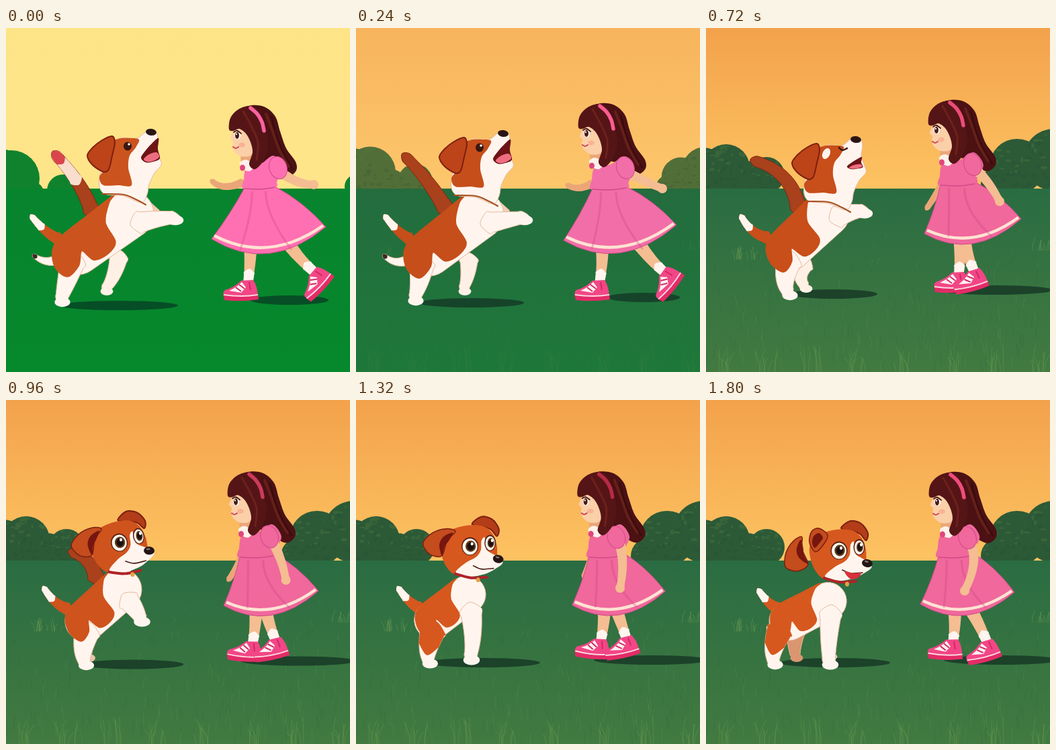
Recreate the animation shown at these times as an HTML page. Size 512x512 px, loop 1920 ms.

```html
<!DOCTYPE html>
<html lang="en">
<head>
<meta charset="utf-8">
<title>Girl and puppy</title>
<style>
html, body { margin: 0; width: 100%; height: 100%; overflow: hidden; background: #f4a34b; }
svg { display: block; width: 100vw; height: 100vh; }
</style>
</head>
<body>
<svg id="stage" viewBox="0 0 512 512" preserveAspectRatio="none"></svg>
<script>
const LOOP = 1920, STEP = 120;
const TIMES = [0, 240, 480, 720, 1200, 1560, 1800];
const stage = document.getElementById('stage');
const updaters = [];

function el(name, attrs, parent = stage) {
  const node = document.createElementNS('http://www.w3.org/2000/svg', name);
  for (const k in attrs) node.setAttribute(k, attrs[k]);
  return parent.appendChild(node);
}

const nums = s => String(s).split(/[ ,]+/).map(Number);
const mix = (a, b, u) => a + (b - a) * u;
const clamp = (v, a, b) => Math.max(a, Math.min(b, v));

// Interpolates key poses; the last one holds, `first` delays the first one.
function track(keys, first = 0) {
  const poses = keys.map(nums), last = poses.length - 1;
  return t => {
    let i = TIMES.length - 1;
    while (TIMES[i] > t) i--;
    const a = poses[clamp(i - first, 0, last)], b = poses[clamp(i + 1 - first, 0, last)];
    const u = i < TIMES.length - 1 ? (t - TIMES[i]) / (TIMES[i + 1] - TIMES[i]) : 0;
    return a.map((v, n) => mix(v, b[n], u));
  };
}

function animate(keys, apply, first) {
  const pose = track(keys, first);
  updaters.push(t => apply(pose(t)));
}

function tint(node, attr, colour) {
  if (Array.isArray(colour)) animate(colour, c => node.setAttribute(attr, `rgb(${c.map(Math.round)})`));
  else node.setAttribute(attr, colour);
}

function show(node, from, to = LOOP) {
  updaters.push(t => node.setAttribute('visibility', t >= from && t < to ? 'inherit' : 'hidden'));
}

// Smooth curve through points.
function curve(p, closed = true, k = 0.16) {
  const n = p.length;
  const at = i => closed ? p[(i + n) % n] : p[clamp(i, 0, n - 1)];
  let d = 'M' + p[0];
  for (let i = 0; i < (closed ? n : n - 1); i++) {
    const [a, b, c, e] = [at(i - 1), at(i), at(i + 1), at(i + 2)];
    d += `C${b[0] + (c[0] - a[0]) * k},${b[1] + (c[1] - a[1]) * k} ` +
         `${c[0] - (e[0] - b[0]) * k},${c[1] - (e[1] - b[1]) * k} ${c}`;
  }
  return d + (closed ? 'Z' : '');
}

const points = s => s.split(' ').map(nums);
function blob(fill, s, parent, attrs = {}) {
  const node = el('path', { d: curve(points(s)), ...attrs }, parent);
  tint(node, 'fill', fill);
  return node;
}
function stroke(colour, width, s, parent, opacity = 1) {
  const node = el('path', { d: curve(points(s), false), fill: 'none', 'stroke-width': width, 'stroke-linecap': 'round', opacity }, parent);
  tint(node, 'stroke', colour);
  return node;
}
function oval(fill, x, y, rx, ry, parent, turn = 0) {
  return el('ellipse', { cx: x, cy: y, rx, ry, fill, transform: `rotate(${turn} ${x} ${y})` }, parent);
}

// Tapered limb: root, middle and end joint; s is the drawn part of its length.
function limb(fill, keys, w0, w1, o = {}) {
  const node = el('path', { stroke: o.edge || 'none', 'stroke-width': 1 });
  const [s0, s1] = o.s || [0, 1], N = 8;
  tint(node, 'fill', fill);
  animate(keys, ([ax, ay, mx, my, bx, by]) => {
    const cx = 2 * mx - (ax + bx) / 2, cy = 2 * my - (ay + by) / 2, one = [], two = [];
    for (let i = 0; i <= N; i++) {
      const s = mix(s0, s1, i / N);
      const x = mix(mix(ax, cx, s), mix(cx, bx, s), s), y = mix(mix(ay, cy, s), mix(cy, by, s), s);
      const dx = mix(cx - ax, bx - cx, s), dy = mix(cy - ay, by - cy, s), len = Math.hypot(dx, dy) || 1;
      const h = mix(w0, w1, s) / 2, tx = dx / len * h, ty = dy / len * h;
      if (i === 0) one.push([x - tx * 0.7, y - ty * 0.7]);
      one.push([x - ty, y + tx]);
      two.unshift([x + ty, y - tx]);
      if (i === N) one.push([x + tx, y + ty]);
    }
    node.setAttribute('d', curve(one.concat(two)));
  }, o.first);
  if (o.from || o.to) show(node, o.from || 0, o.to);
  return node;
}

// Group moved by x, y and an angle about a pivot.
function group(keys, first, px = 0, py = 0, parent = stage) {
  const node = el('g', {}, parent);
  animate(keys, ([x, y, r = 0]) => node.setAttribute('transform', `translate(${x} ${y}) rotate(${r} ${px} ${py})`), first);
  return node;
}

let seed = 7;
function rand(a, b) {
  seed = (seed * 16807) % 2147483647;
  return mix(a, b, seed / 2147483647);
}

/* ---------- meadow ---------- */
const defs = el('defs', {});
function gradient(id, y1, y2, stops) {
  const g = el('linearGradient', { id, gradientUnits: 'userSpaceOnUse', x1: 0, x2: 0, y1, y2 }, defs);
  stops.forEach((keys, i) => tint(el('stop', { offset: i / (stops.length - 1) }, g), 'stop-color', keys));
}
gradient('sky', 0, 240, [
  ['253 228 135', '247 180 92', '245 168 80', '243 162 76'],
  ['255 229 138', '253 199 108', '254 199 100', '253 195 98']]);
gradient('grass', 238, 512, [
  ['8 132 46', '36 108 62', '42 106 65', '42 108 66'],
  ['6 136 44', '30 120 58', '48 118 64', '66 122 64']]);
el('rect', { width: 512, height: 512, fill: 'url(#sky)' });

// A round canopy that grows from one circle into another.
function canopy(young, grown) {
  const node = el('g', {}), leaves = el('g', {});
  tint(el('circle', { r: 1 }, node), 'fill', ['16 130 45', '82 110 56', '46 92 55', '44 90 55']);
  for (let i = 0; i < 40; i++) {
    const a = rand(0, 2 * Math.PI), r = 0.92 * Math.sqrt(rand(0, 1));
    const y = r * Math.sin(a), light = y < rand(-0.7, 0.5);
    oval(light ? '#557a40' : '#234f36', r * Math.cos(a), y, rand(0.04, 0.13), rand(0.03, 0.08), leaves);
  }
  node.appendChild(leaves);
  animate([0, 0.6, 0.85, 1], ([g]) => {
    const [x, y, r] = young.map((v, i) => mix(v, grown[i], g));
    node.setAttribute('transform', `translate(${x} ${y}) scale(${r})`);
    leaves.setAttribute('opacity', 0.35 * g);
  });
}
canopy([-8, 215, 35], [-4, 214, 36]);
canopy([40, 245, 16], [62, 222, 24]);
canopy([85, 242, 24], [90, 219, 27]);
canopy([8, 224, 42], [30, 208, 35]);
canopy([508, 246, 6], [436, 232, 27]);
canopy([514, 244, 10], [463, 206, 41]);
canopy([522, 236, 18], [518, 196, 46]);
el('rect', { y: 239, width: 512, height: 273, fill: 'url(#grass)' });

const field = el('g', { fill: 'none', 'stroke-linecap': 'round' });
animate([0, 0.25, 0.6, 1], ([a]) => field.setAttribute('opacity', a));
function blade(x, y, h, lean, colour, opacity) {
  el('path', { d: `M${x},${y}q0,${-h * 0.6} ${lean},${-h}`, stroke: colour, opacity }, field);
}
for (let i = 0; i < 220; i++) {
  const y = 260 + 255 * Math.sqrt(rand(0, 1));
  blade(rand(0, 512), y, (y - 225) / 14, rand(-4, 4), i % 2 ? '#6a9a50' : '#22613c', 0.25);
}
for (let x = 22; x < 512; x += 68)
  for (let i = 0; i < 8; i++) blade(x + rand(-14, 14), 514, rand(18, 42), rand(-12, 12), '#6a9a50', 0.45);
for (const [x, y] of [[60, 344], [500, 331]])
  for (let i = 0; i < 14; i++) blade(x + rand(-22, 22), y, rand(7, 20), rand(-5, 5), '#6f9a55', 0.5);

function shadow(keys) {
  const node = el('ellipse', { ry: 7 });
  tint(node, 'fill', ['6 78 38', '22 68 42', '28 66 42']);
  animate(keys, v => ['cx', 'cy', 'rx'].forEach((a, i) => node.setAttribute(a, v[i])));
}
shadow(['168 413 88', '172 409 78', '176 402 76', '190 396 65', '188 391 86', '192 391 82']);
shadow(['422 405 58', '428 401 54', '445 396 60', '430 390 86', '440 387 86']);

/* ---------- puppy ---------- */
const coat = ['203 84 30', '198 78 26', '198 78 26', '200 78 26', '214 88 30'];
const white = '#fff5ee', edge = '#e3b79c', dark = '#7c1f10';

const tail = ['128,274 108,232 74,189', '134,270 106,228 74,192', '135,270 112,215 62,203', '138,270 117,224 73,198', '130,262 128,258 126,256'];
limb('#a8411c', tail, 23, 15, { to: 1080, edge: '#81260f' });
limb('#f9ddcd', tail, 23, 15, { to: 120, s: [0.55, 1] });
limb('#d9454b', tail, 23, 15, { to: 120, s: [0.9, 1] });

const lowStub = ['80,344 60,347 42,339', '80,344 60,348 42,339', '90,336 86,334 82,332'];
limb(white, lowStub, 16, 6, { to: 480, edge });
limb('#3a2924', lowStub, 16, 6, { to: 480, s: [0.93, 1] });
const stub = ['78,314 58,301 39,281', '80,314 62,301 44,281', '88,314 64,304 42,286', '92,312 70,302 53,281', '92,310 76,298 61,280', '98,308 84,300 69,282', '106,310 92,300 79,284'];
limb(coat, stub, 18, 9);
limb(white, stub, 18, 9, { s: [0.62, 1] });

function leg(fill, keys, w0, w1) {
  limb(fill, keys, w0, w1, { edge });
  const paw = el('ellipse', { rx: w1 * 0.68, ry: w1 * 0.42 });
  tint(paw, 'fill', fill);
  animate(keys, p => paw.setAttribute('transform', `translate(${p[4] + 2} ${p[5] + 4})`));
}
leg('#f3cdb4', ['198,258 212,267 225,276', '198,258 212,267 225,276', '196,258 210,267 223,276', '192,264 198,270 204,276', '168,326 171,338 171,348', '184,322 184,355 184,378', '188,322 187,355 186,378'], 20, 11);
leg(['255 240 230', '255 240 230', '255 240 230', '255 240 230', '218 150 110'],
  ['168,340 160,368 148,388', '168,344 166,368 160,388', '152,346 146,368 156,388', '148,350 141,368 147,384', '100,345 97,362 96,376', '124,345 124,362 122,378', '134,345 132,364 133,380'], 27, 14);

// Torso: two circles joined by their outer tangents, with a coat saddle along the axis.
const torso = el('path', { fill: white, stroke: edge }), saddle = el('path', { 'stroke-width': 2 });
const saddleShape = points('1,1.02 .85,.9 .62,.32 .57,-.59 .37,-.82 .14,-.69 .07,-.06 -.1,-.5 -.34,-.6 -.41,.03 -.29,.7 -.05,.98 .5,1.01');
tint(saddle, 'fill', coat);
tint(saddle, 'stroke', coat);
animate(['106,334,34 184,277,36', '108,336,34 184,278,36', '116,330,34 182,280,36', '122,330,33 180,276,34', '114,328,28 162,288,28', '117,326,29 172,292,28', '123,329,29 182,299,28'],
  ([x0, y0, r0, x1, y1, r1]) => {
    const dx = x1 - x0, dy = y1 - y0, dir = Math.atan2(dy, dx), open = Math.acos((r1 - r0) / Math.hypot(dx, dy));
    const on = (x, y, r, a) => [x + r * Math.cos(a), y + r * Math.sin(a)];
    const up = dir - open, down = dir + open;
    torso.setAttribute('d', `M${on(x0, y0, r0, up)}L${on(x1, y1, r1, up)}A${r1},${r1} 0 0 1 ${on(x1, y1, r1, down)}` +
      `L${on(x0, y0, r0, down)}A${r0},${r0} 0 0 1 ${on(x0, y0, r0, up)}Z`);
    saddle.setAttribute('d', curve(saddleShape.map(([u, v]) =>
      on(x0 + dx * u, y0 + dy * u, v * mix(r0, r1, clamp(u, 0, 1)), dir - Math.PI / 2))));
  });
const hindLeg = ['100,345 90,378 82,404', '98,350 94,378 87,402', '112,345 102,376 102,396', '124,345 118,374 123,394', '118,342 112,370 112,388', '108,342 99,370 101,389', '110,342 101,370 101,390'];
leg(white, hindLeg, 38, 17);
stage.appendChild(saddle);
limb(coat, hindLeg, 38, 17, { from: 1200, s: [0, 0.4] });
leg(white, ['196,290 222,285 250,282', '196,290 222,286 249,282', '195,290 218,284 245,283', '194,282 214,275 234,272', '168,312 172,350 167,380', '176,312 177,352 176,389', '186,316 183,355 183,390'], 32, 18);

// head raised
const high = group(['-5 -2 0', '-2 0 0', '0 0 0', '2 9 0', '-12 30 45'], 0, 175, 225);
show(high, 0, 960);
blob(white, '160,180 175,166 200,166 214,156 228,157 231,167 229,182 234,196 236,206 226,218 218,235 215,250 206,262 180,252 150,248 144,225', high, { stroke: edge });
blob(coat, '158,176 172,167 190,166 203,168 198,180 189,192 187,210 192,236 172,236 150,236 144,224 152,210', high);
stroke('#a85020', 2.2, '148,249 180,250 200,258 213,265', high);
const mouth = el('g', {}, high);
animate(['1 1', '1 1', '1 1', '.85 .5'], ([sx, sy]) =>
  mouth.setAttribute('transform', `translate(218 200) scale(${sx} ${sy}) translate(-218 -200)`));
blob('#6d1417', '232,166 222,174 213,184 206,195 213,202 224,201 234,196 231,182', mouth);
blob('#ee6d80', '210,197 218,190 229,187 233,194 224,200 215,201', mouth);
oval('#2a1514', 221, 157, 8, 5, high, 8);
const awake = el('g', {}, high), asleep = el('g', {}, high);
oval('#3a1712', 186, 178, 6, 6.5, awake);
oval('#fff', 188, 175, 1.8, 1.8, awake);
oval(white, 177, 178, 5.5, 8.5, asleep, 25);
stroke('#3a1712', 2.5, '196,169 201,173 208,170', asleep);
show(awake, 0, 720);
show(asleep, 720);
blob('#bd4319', '163,163 148,169 134,180 126,192 134,206 150,216 158,212 163,192 167,173', high, { stroke: dark, 'stroke-width': 2 });

// head level
const level = group(['10 -8 -18', '0 0 0', '14 5 0', '33 8 0'], 3, 165, 225);
show(level, 960);
blob('#b23d18', '168,183 182,172 198,176 208,190 205,201 197,192 186,187', level, { stroke: dark, 'stroke-width': 2 });
blob(coat, '122,208 134,193 160,185 185,186 199,198 205,215 206,230 212,234 212,242 202,249 188,256 165,261 142,258 129,245 122,226', level);
blob(white, '144,255 158,241 174,232 181,222 182,208 187,203 189,220 200,228 212,234 213,242 202,250 188,257 165,261', level);
stroke('#b0222a', 4, '143,257 166,263 190,262', level);
oval('#e5a047', 177, 266, 3, 3.5, level);
for (const [x, y, rx, ry] of [[165, 216, 11, 12], [195, 211, 7, 10.5]]) {
  oval('#5b2115', x, y, rx + 1.5, ry + 1.5, level);
  oval('#fffaf0', x, y + 0.5, rx, ry, level);
  oval('#5c3a22', x + 1, y, rx * 0.7, ry * 0.7, level);
  oval('#1c100e', x + 1, y, rx * 0.48, ry * 0.5, level);
  oval('#fff', x + 3, y - 3.5, 2, 2.4, level);
}
oval('#231614', 207, 235, 8, 6, level, 12);
oval('#8a7470', 206, 232.5, 3, 1.3, level, 10);
stroke('#4a1c16', 1.7, '170,245 182,250 200,249', level);
show(blob('#d8303c', '174,247 188,250 198,249 194,256 184,259 177,254', level), 1680);
const flap = group(['0 0 0', '4 6 0', '-16 16 -42'], 4, 118, 207, level);
blob('#c44c1d', '94,208 108,194 128,188 142,192 130,205 122,228 108,228 98,220', flap, { stroke: dark, 'stroke-width': 1.5 });
blob('#76160f', '118,212 124,200 138,194 132,206 126,214 122,228', flap);
const prick = el('g', {}, level);
blob('#c44c1d', '121,204 124,188 135,183 148,193 142,207 130,218', prick, { stroke: dark, 'stroke-width': 1.5 });
blob('#76160f', '125,205 127,195 135,190 141,197 135,206 129,212', prick);
show(prick, 1680);

/* ---------- girl ---------- */
const skin = '#f5bd92', pink = ['255 112 178', '242 110 168', '243 106 164', '240 104 156'], seam = '#d04a8a';
const headMove = ['1 4', '0 1', '0 0', '0 -4', '-2 -5', '0 -4', '1 -4'];
const hair = group(headMove);
blob('#4b1113', '334,132 345,118 365,111 385,114 400,128 407,150 416,175 430,195 431,208 420,217 405,212 390,200 375,195 360,175 350,150', hair);
stroke('#76281c', 4, '386,124 396,150 406,178 420,202', hair, 0.65);
stroke('#2f090d', 2.5, '394,128 402,158 414,186 426,206', hair, 0.6);

limb('#eba678', ['352,230 326,236 307,228', '352,231 332,238 315,234', '350,232 339,239 328,244', '350,236 341,250 329,268', '350,238 341,256 334,266', '352,236 350,246 349,255'], 12, 8);

function girlLeg(keys, turns) {
  limb(skin, keys, 20, 13);
  limb('#fff4ee', keys, 20, 14, { s: [0.72, 1] });
  const shoe = el('g', {});
  el('path', { d: 'M-10,-6L8,-7Q14,2 15,17L-34,18Q-39,12 -34,8Q-20,4 -10,-6Z', fill: '#f24686' }, shoe);
  el('path', { d: 'M-28,9Q-16,4 -9,-4L-3,4L-10,12Z', fill: '#fff0f0' }, shoe);
  el('path', { d: 'M-18,4l8,6M-13,0l8,6M2,-4l2,12', stroke: '#d02a62', 'stroke-width': 2, fill: 'none' }, shoe);
  el('path', { d: 'M-37,14Q-10,18 15,14L16,22Q-10,26 -35,23Z', fill: '#e22c67' }, shoe);
  el('path', { d: 'M-36,15Q-10,19 15,15', stroke: '#ffd9e2', 'stroke-width': 2, fill: 'none' }, shoe);
  const turn = track(turns), pose = track(keys);
  updaters.push(t => shoe.setAttribute('transform', `translate(${pose(t).slice(4)}) rotate(${turn(t)})`));
}
girlLeg(['364,320 363,350 360,382', '366,320 366,350 362,382', '373,320 374,350 371,380', '378,310 378,340 376,370', '366,308 363,335 357,362', '377,310 378,336 377,363', '370,310 370,338 367,363'], [0, 0, 0, 0, 9, 0, 2]);
girlLeg(['420,320 438,343 462,366', '422,322 440,345 462,366', '418,322 436,343 459,364', '384,310 390,338 401,366', '388,308 395,330 404,356', '384,310 394,336 403,363', '393,310 407,336 420,364'], [-46, -50, -54, -14, -8, -18, -14]);

// Dress: the skirt hangs between waist and hem corners, the bodice follows the waist.
const skirt = el('path', { stroke: seam }), hem = el('path', { fill: 'none', stroke: '#ffe3d2', 'stroke-width': 4.5 });
const folds = el('path', { fill: 'none', stroke: '#c93f83', 'stroke-width': 3, opacity: 0.3 });
const bodice = el('g', {});
tint(skirt, 'fill', pink);
blob(pink, '0,2 -1,-13 4,-32 28,-36 50,-48 65,-30 56,-10 52,-1', bodice);
stroke(seam, 1.5, '0,1 26,2 52,-1', bodice);
animate(['355,238 400,236 306,314 476,296', '352,239 402,236 309,316 477,293', '350,238 402,236 317,315 477,291', '349,233 400,229 325,306 469,284', '347,233 395,226 323,306 461,284', '346,233 395,226 319,304 459,286'],
  ([ax, ay, bx, by, lx, ly, rx, ry]) => {
    const w = rx - lx, mx = (lx + rx) / 2, my = (ly + ry) / 2 + w * 0.36;
    skirt.setAttribute('d', `M${ax},${ay}L${bx},${by}Q${(bx + rx) / 2 + 3},${(by + ry) / 2 - 9} ${rx},${ry}` +
      `Q${mx},${my} ${lx},${ly}Q${(ax + lx) / 2 + 4},${(ay + ly) / 2} ${ax},${ay}Z`);
    hem.setAttribute('d', `M${lx + 4},${ly - 5}Q${mx},${my - 15} ${rx - 4},${ry - 2}`);
    folds.setAttribute('d', [0.25, 0.7].map(u =>
      `M${mix(ax, bx, u)},${ay + 5}Q${mix(ax, bx, u)},${ay + 40} ${mix(lx, rx, u)},${my - 36}`).join(''));
    bodice.setAttribute('transform', `translate(${ax} ${ay}) scale(${(bx - ax) / 52} 1)`);
  });

const arm = ['410,216 435,229 458,233', '406,216 430,228 456,239', '406,216 428,233 453,246', '402,211 421,232 437,258', '392,212 397,245 396,278', '393,213 396,245 387,284', '394,213 398,245 385,284'];
limb(skin, arm, 15, 11);
const hand = oval(skin, 0, 0, 7, 7), sleeve = oval('', 0, 0, 13, 17);
tint(sleeve, 'fill', pink);
sleeve.setAttribute('stroke', seam);
animate(arm, a => {
  hand.setAttribute('transform', `translate(${a[4]} ${a[5]})`);
  sleeve.setAttribute('transform', `translate(${a[0] - 5} ${a[1] - 8}) rotate(-18)`);
});

const face = group(headMove);
blob('#eba678', '350,180 368,180 372,200 360,206 350,200', face);
blob('#fff1ea', '347,197 356,192 368,200 362,209 352,206', face);
oval('#e0467f', 351, 204, 4, 4.5, face);
blob('#fbd0a8', '338,140 336,152 333,160 337,165 336,173 340,181 349,187 364,185 370,165 366,145', face);
oval('#f8b394', 350, 170, 5, 3.5, face);
oval('#fff', 343.5, 156, 4.5, 5.5, face);
oval('#4a1a14', 343, 156, 3, 5, face);
oval('#fff', 342, 154, 1, 1.3, face);
stroke('#3a0f10', 1.8, '338,151 343,149 349,153', face);
stroke('#d0475a', 2, '337,173 341,175 345,173', face);
blob('#551516', '331,147 333,130 345,117 362,112 376,120 385,148 389,170 383,192 370,206 361,199 366,181 363,166 356,153 346,146 338,149', face);
stroke('#7d2b20', 3, '352,120 364,142 374,166 372,192', face, 0.6);
stroke(['250 98 160', '250 92 146', '250 92 146', '236 76 120', '176 40 62', '196 46 78', '240 76 124'], 5.5, '363,115 373,124 380,136 383,149', face);

/* ---------- clock ---------- */
const start = performance.now();
function frame(now) {
  const t = Math.floor((Math.max(0, now - start) % LOOP) / STEP) * STEP;
  updaters.forEach(f => f(t));
  requestAnimationFrame(frame);
}
frame(start);
</script>
</body>
</html>
```
